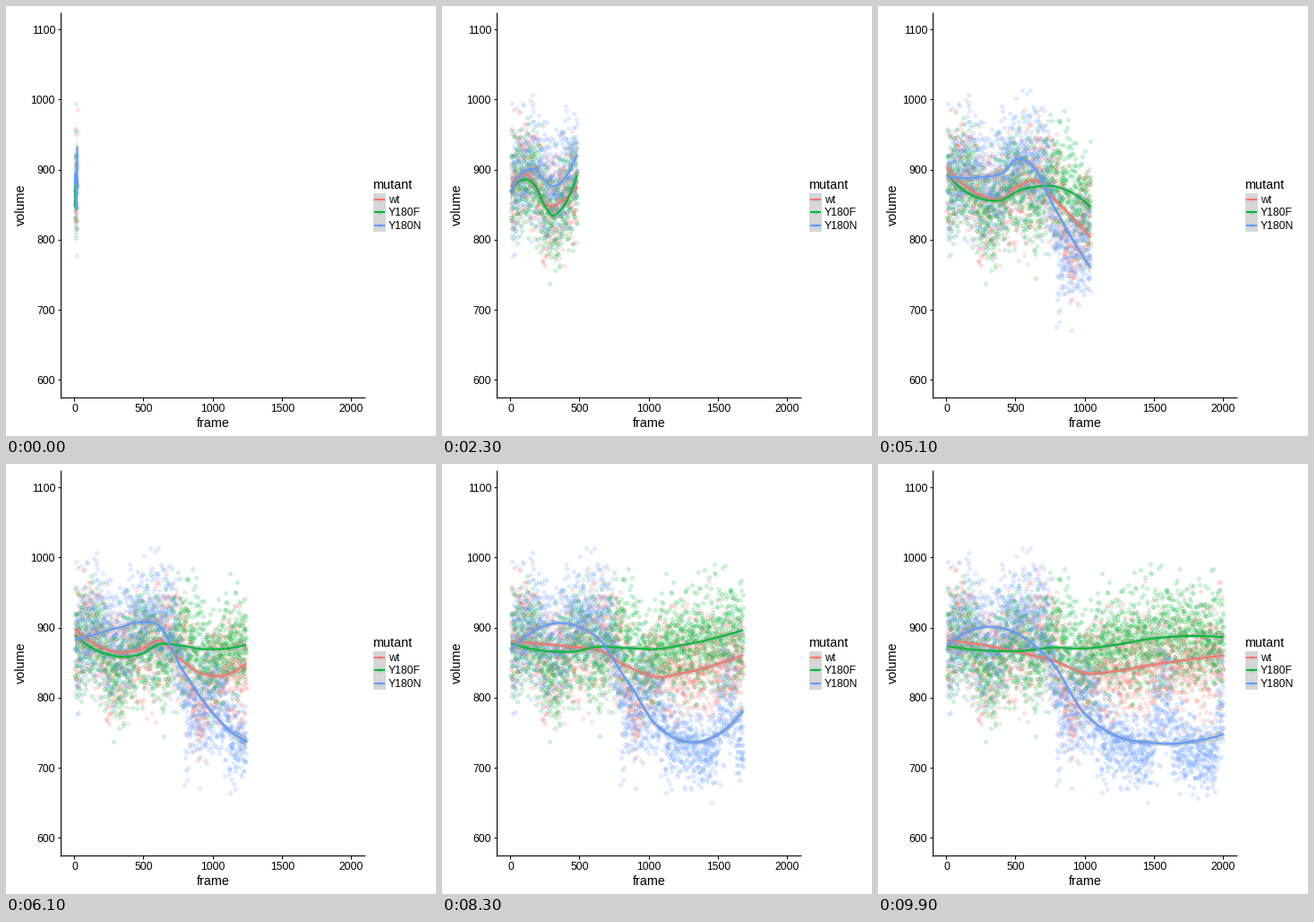
A matplotlib script for the animation above (10000 ms loop, 480 by 480 pixels).

```python
import numpy as np
import matplotlib.pyplot as plt
from matplotlib.animation import FuncAnimation
from matplotlib.colors import to_rgba
from matplotlib.patches import Polygon, Rectangle

SIZE, STEPS, STRIDE = 480, 100, 20
TOTAL = STEPS * STRIDE
PT = 0.72  # points per pixel at 100 dpi
SPAN, CELLS, GRID = 0.75, 8, 80
LABEL, TITLE = 12.3, 14.4

plt.rcParams["font.family"] = "Liberation Sans"
rng = np.random.default_rng(180)
x_all = np.arange(1, TOTAL + 1)

# name, colour, sd, key points of the mean as (x, y)
SERIES = [
    ("wt", "#F8766D", 41,
     [(0, 875), (90, 902), (160, 892), (250, 842), (400, 864), (680, 890),
      (790, 870), (900, 775), (980, 838), (1500, 850), (2000, 860)]),
    ("Y180F", "#00BA38", 38,
     [(0, 874), (160, 890), (300, 824), (400, 862), (500, 888), (640, 855),
      (720, 885), (840, 885), (1000, 845), (1100, 876), (1680, 893),
      (2000, 883)]),
    ("Y180N", "#619CFF", 42,
     [(0, 872), (140, 908), (310, 872), (480, 915), (640, 915), (740, 885),
      (800, 780), (1050, 795), (1120, 745), (1450, 718), (1530, 790),
      (1610, 795), (1650, 735), (1930, 710), (1970, 790), (2000, 795)]),
]


def sample(sd, keys):
    """Noise around the mean line, narrower where the volume is low."""
    level = np.interp(x_all, *zip(*keys))
    noise = np.clip(rng.normal(size=(STEPS, STRIDE)), -2.8, 2.8)
    noise -= noise.mean(axis=1, keepdims=True)
    return level + sd * np.interp(level, (730, 780), (0.62, 1)) * noise.ravel()


def loess(n, at):
    """Matrix from the first n values to the local quadratic smooth at `at`."""
    x = x_all[:n]
    nodes = np.linspace(1, n, CELLS + 1)
    value, slope = [], []
    for node in nodes:
        u = (x - node) / n
        dist = np.abs(u)
        reach = np.sort(dist)[int(SPAN * n) - 1] * 1.0001
        w = np.clip(1 - (dist / reach) ** 3, 0, None) ** 3
        basis = np.vstack([np.ones(n), u, u * u])
        coef = np.linalg.solve((basis * w) @ basis.T, basis * w)
        value.append(coef[0])
        slope.append(coef[1] / n)
    value, slope = np.array(value), np.array(slope)

    # cubic blending between the nodes
    dx = nodes[1] - nodes[0]
    cell = np.clip(((at - 1) / dx).astype(int), 0, CELLS - 1)
    t = ((at - nodes[cell]) / dx)[:, None]
    return ((1 + 2 * t) * (1 - t) ** 2 * value[cell]
            + t * (1 - t) ** 2 * dx * slope[cell]
            + t * t * (3 - 2 * t) * value[cell + 1]
            + t * t * (t - 1) * dx * slope[cell + 1])


def px(x):
    return 76.6 + 0.1545 * np.asarray(x)


def py(y):
    return 26.7 + 0.782 * (1100 - np.asarray(y))


fig = plt.figure(figsize=(SIZE / 100, SIZE / 100), dpi=100, facecolor="white")
ax = fig.add_axes([0, 0, 1, 1])
ax.set(xlim=(0, SIZE), ylim=(SIZE, 0))
ax.axis("off")


def line(xs, ys, color="black", width=1.07, z=5):
    return ax.plot(xs, ys, color=color, lw=width * PT, zorder=z,
                   solid_capstyle="butt", solid_joinstyle="round")[0]


def dots(xs, ys, color):
    return ax.plot(xs, ys, "o", ms=3.7 * PT, mew=0.9 * PT, zorder=1,
                   mfc=to_rgba(color, 0.12), mec=to_rgba(color, 0.27))[0]


def ribbon(z):
    return ax.add_patch(Polygon(np.zeros((3, 2)), closed=True, lw=0,
                                fc="#999999", alpha=0.4, zorder=z))


def text(x, y, s, size=LABEL, ha="left", **kw):
    ax.text(x, y, s, fontsize=size * PT, ha=ha, va="baseline",
            color="black", zorder=6, **kw)


# axes, on whole pixels
line([61, 61], [7, 438])
line([61, 401], [437, 437])
for v in range(600, 1101, 100):
    line([58, 61], [np.floor(py(v))] * 2)
    text(55, py(v) + 4, str(v), ha="right")
for v in range(0, 2001, 500):
    line([np.floor(px(v))] * 2, [437, 441])
    text(px(v), 453, str(v), ha="center")
text(231.2, 470, "frame", TITLE, "center")
text(21, 222, "volume", TITLE, "center", rotation=90, rotation_mode="anchor")
text(409.5, 204, "mutant", TITLE)

plots = []
for i, (name, color, sd, keys) in enumerate(SERIES):
    top = 208.5 + 14.4 * i
    mid = top + 7.2
    dots([417.2], [mid], color)
    ax.add_patch(Rectangle((410, top), 14.4, 14.4, fc="#999999", alpha=0.4,
                           lw=0, zorder=2))
    line([411.4, 422.9], [mid, mid], color, 2.13)
    text(427, mid + 4.3, name)

    z = 3 + i / 4
    plots.append((sample(sd, keys), dots([], [], color), ribbon(z),
                  line([], [], color, 2.13, z + 0.1)))


def draw(step):
    n = (step + 1) * STRIDE
    x = x_all[:n]
    at = np.linspace(1, n, GRID)
    smooth = loess(n, at)
    norm = np.sqrt((smooth ** 2).sum(axis=1))
    artists = []
    for values, points, band, curve in plots:
        y = values[:n]
        fit = smooth @ y
        sigma = np.sqrt(((y - np.interp(x, at, fit)) ** 2).sum() / (n - 5))
        err = 1.96 * sigma * norm
        points.set_data(px(x), py(y))
        curve.set_data(px(at), py(fit))
        band.set_xy(np.column_stack([
            px(np.r_[at, at[::-1]]),
            py(np.r_[fit - err, (fit + err)[::-1]])]))
        artists += [points, band, curve]
    return artists


anim = FuncAnimation(fig, draw, frames=STEPS, interval=100, repeat=True,
                     repeat_delay=0, blit=False)
plt.show()
```
